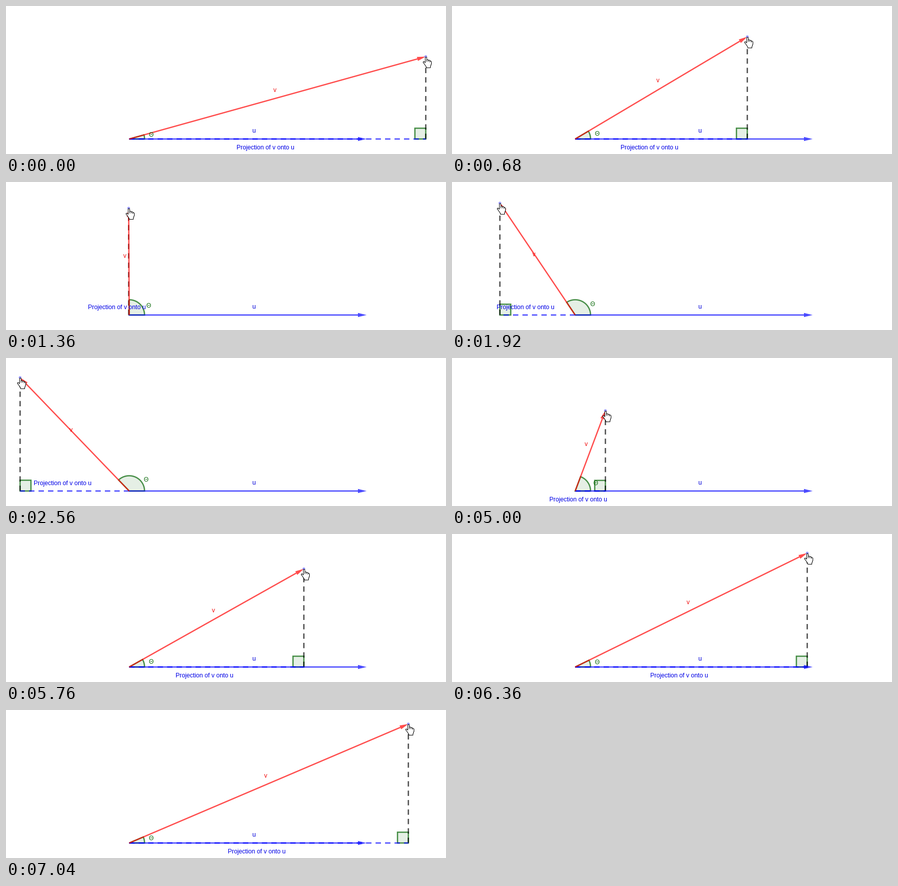
These frames come from a looping animation (859 by 291 pixels, 7.2 s). A matplotlib script:

```python
import math

import matplotlib.pyplot as plt
import numpy as np
from matplotlib.animation import FuncAnimation
from matplotlib.patches import Circle, Polygon

W, H, DPI = 859, 291, 64
PX = 72 / DPI  # points per pixel
FRAMES, STEP_MS = 180, 40

ORIGIN = np.array([240.5, 261.5])
U_TIP = np.array([704, 261.5])
LINE = 2.5
RADIUS = 30
BLUE, RED, GREEN, BLACK = (0, 0, 1), (1, 0, 0), (0, 0.39, 0), (0, 0, 0)

# Drag path of the tip of v: frame, x, y
PATH = np.array([
    (0, 819, 99), (2, 819, 99), (21, 493, 54), (34, 239, 51), (40, 178, 45),
    (58, 28, 39), (61, 28, 39), (64, 27, 38), (67, 14, 37), (73, 14, 37),
    (91, 18, 141), (92, 16, 142), (95, 17, 142), (101, 17, 142),
    (112, 20, 70), (115, 20, 70), (125, 299, 103), (134, 484, 85),
    (144, 581, 68), (153, 631, 46), (170, 786, 28), (175, 786, 28),
    (176, 785, 27), (179, 785, 27),
], float)

HAND = np.array([
    (4, 1), (5, 0), (6, 0), (7, 1), (7, 5), (9, 5), (10, 6), (12, 6), (13, 7),
    (15, 8), (16, 9), (16, 14), (15, 15), (15, 17), (14, 18), (14, 21),
    (6, 21), (6, 19), (5, 18), (4, 16), (3, 15), (2, 13), (0, 11), (0, 9),
    (2, 9), (3, 10), (4, 11),
], float)
FINGER_GAPS = [(7, 5, 9), (10, 6, 9), (13, 7, 10)]

plt.rcParams.update({
    "path.snap": False,
    "lines.solid_capstyle": "butt",
    "font.family": "Liberation Sans",
    "font.size": 12 * PX,
})

fig = plt.figure(figsize=(W / DPI, H / DPI), dpi=DPI, facecolor="white")
ax = fig.add_axes([0, 0, 1, 1])


def monotone_slopes(t, values):
    """Harmonic-mean tangents: smooth, without overshoot, flat at rests."""
    secant = np.diff(values) / np.diff(t)
    slopes = np.zeros(len(t))
    for k in range(1, len(t) - 1):
        a, b = secant[k - 1], secant[k]
        if a * b > 0:
            slopes[k] = 2 * a * b / (a + b)
    return slopes


TIMES = PATH[:, 0]
SLOPES = np.column_stack([monotone_slopes(TIMES, PATH[:, c]) for c in (1, 2)])


def tip_at(frame):
    k = min(np.searchsorted(TIMES, frame, side="right") - 1, len(TIMES) - 2)
    span = TIMES[k + 1] - TIMES[k]
    s = (frame - TIMES[k]) / span
    p, q = PATH[k, 1:], PATH[k + 1, 1:]
    ease = s * s * (3 - 2 * s)
    start, end = s * (1 - s) ** 2, s * s * (s - 1)
    pos = p + (q - p) * ease + span * (start * SLOPES[k] + end * SLOPES[k + 1])
    return np.round(pos)


def segment(a, b, color, z, dashed=False):
    style = (0, (10.5 / LINE, 8 / LINE)) if dashed else "-"
    ax.plot([a[0], b[0]], [a[1], b[1]], color=color, alpha=0.7, lw=LINE * PX,
            ls=style, zorder=z)


def vector(a, b, color, z):
    along = (b - a) / np.hypot(*(b - a))
    side = np.array([-along[1], along[0]]) * 4
    base = b - along * 17
    segment(a, base, color, z)
    ax.add_patch(Polygon([b, base + side, base - side], fc=color, ec="none",
                         alpha=0.7, zorder=z))


def angle_mark(points):
    ax.add_patch(Polygon(points, fc=(*GREEN, 0.1), ec=(*GREEN, 0.7),
                         lw=LINE * PX, zorder=1))


def label(x, y, text, color):
    ax.text(math.floor(x), H - math.floor(H - y), text, color=color,
            ha="left", va="baseline", zorder=6)


def hand_cursor(tip):
    corner = tip + (-4.5, 1.5)
    ax.add_patch(Polygon(HAND + corner, fc="white", ec="black", lw=PX, zorder=8))
    for x, top, bottom in FINGER_GAPS:
        ax.plot([x + corner[0]] * 2, [top + corner[1], bottom + corner[1]],
                color="black", lw=PX, zorder=9)


def draw(frame):
    ax.clear()
    ax.set(xlim=(0, W), ylim=(H, 0))
    ax.axis("off")

    pixel = tip_at(frame)
    tip = pixel + 0.5
    foot = np.array([tip[0], ORIGIN[1]])
    dx, dy = tip[0] - ORIGIN[0], ORIGIN[1] - tip[1]
    theta = math.atan2(dy, dx)

    # angle at the origin and right angle at the foot
    arc = np.linspace(0, theta, 50)
    rim = ORIGIN + RADIUS * np.column_stack([np.cos(arc), -np.sin(arc)])
    angle_mark(np.vstack([ORIGIN, rim]))
    size = min(RADIUS, abs(dx) / 2) * math.sqrt(0.5)
    if size > 1:
        sx = -math.copysign(size, dx)
        angle_mark([foot, foot + (sx, 0), foot + (sx, -size), foot + (0, -size)])

    segment(foot, tip, BLACK, 2, dashed=True)
    segment(ORIGIN, foot, BLUE, 2, dashed=True)
    vector(ORIGIN, U_TIP, BLUE, 3)
    vector(ORIGIN, tip, RED, 4)
    ax.add_patch(Circle(tip, 2.7, fc=(0.5, 0.5, 1), ec="none", alpha=0.8, zorder=5))

    label(480, 249, "u", (0, 0, 0.85))
    mid = (ORIGIN + tip) / 2
    label(mid[0] - 6.6 - 3.8 * math.sin(theta),
          mid[1] - 8.5 - 3.8 * math.cos(theta), "v", (0.95, 0.05, 0.05))
    label(ORIGIN[0] + 20.8 + 17.5 * math.cos(theta / 2),
          ORIGIN[1] - 2.5 - 17.5 * math.sin(theta / 2), "Θ", GREEN)
    label((240 + pixel[0]) / 2 - 79, 282 if dx > 0 else 250,
          "Projection of v onto u", (0, 0, 0.9))

    hand_cursor(pixel)
    return []


anim = FuncAnimation(fig, draw, frames=FRAMES, interval=STEP_MS,
                     init_func=lambda: [], repeat=True, repeat_delay=0)
plt.show()
```
